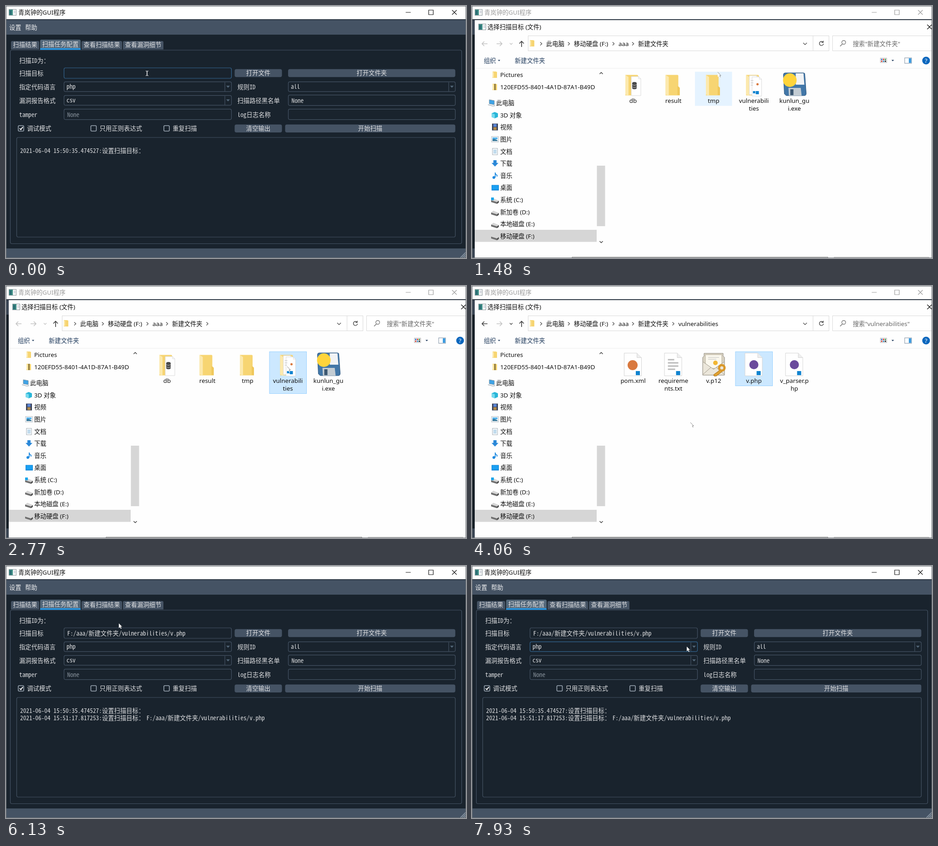
An HTML page that plays this animation: 1011x554 px, repeating every 8000 ms.

```html
<!DOCTYPE html>
<html lang="zh-CN">
<head>
<meta charset="utf-8">
<title>扫描任务配置</title>
<style>
html, body { margin: 0; width: 100%; height: 100%; overflow: hidden; background: #19232d; }
svg { display: block; width: 1011px; height: 554px; }
text { white-space: pre; }
.ui { font: 13.33px "Noto Sans", "Noto Sans CJK SC", "Noto Sans CJK", sans-serif; }
.form {
  font: 300 13.33px "Noto Sans Mono CJK SC", "Noto Sans CJK SC", "Noto Sans CJK", sans-serif;
  font-feature-settings: "hwid";
  fill: #e0e1e3;
}
.line { fill: none; stroke: #455364; stroke-width: 1.2; }
.line.focus { stroke: #346792; }
.thin { fill: none; stroke: #666; stroke-width: 1.2; }
.off { display: none; }
</style>
</head>
<body>
<svg id="stage" viewBox="0 0 1011 554" xmlns="http://www.w3.org/2000/svg"></svg>
<script>
const FOLDER = '新建文件夹';
const TARGET = `F:/aaa/${FOLDER}/vulnerabilities/v.php`;

// Basic shapes
const rect = (x, y, w, h, fill, extra = '') =>
  `<rect x="${x}" y="${y}" width="${w}" height="${h}" fill="${fill}" ${extra}/>`;
const path = (d, extra = 'class="thin"') => `<path d="${d}" ${extra}/>`;
const fillPath = (d, fill) => path(d, `fill="${fill}"`);
const dot = (x, y, r, fill) => `<circle cx="${x}" cy="${y}" r="${r}" fill="${fill}"/>`;
const group = (id, body) => `<g id="${id}">${body}</g>`;
const at = (x, y, body) => `<g transform="translate(${x} ${y})">${body}</g>`;
const ui = (x, y, s, fill = '#111', extra = '') =>
  `<text class="ui" x="${x}" y="${y}" fill="${fill}" ${extra}>${s}</text>`;
const centered = (x, y, s) => ui(x, y, s, '#111', 'text-anchor="middle"');
const form = (x, y, s, extra = '') => `<text class="form" x="${x}" y="${y}" ${extra}>${s}</text>`;

// Form widgets
const box = (x, y, w, h, id = '') =>
  `<rect ${id && `id="${id}"`} class="line" x="${x}" y="${y}" width="${w}" height="${h}" rx="3.5"/>`;
const combo = (x, y, w, s, id) => box(x, y, w, 21.5, id) +
  path(`M${x + w - 14.5} ${y + 1}v20`, 'class="line"') +
  fillPath(`M${x + w - 11.5} ${y + 8.5}h8l-4 4.5z`, '#54687a') + form(x + 5.5, y + 15.5, s);
const button = (x, y, w, s, id = '') =>
  `<rect ${id && `id="${id}"`} x="${x}" y="${y}" width="${w}" height="17.5" rx="4" fill="#455364"/>` +
  form(x + w / 2, y + 13.7, s, 'text-anchor="middle"');
const check = (x, s, on) =>
  `<rect x="${x}" y="263" width="12" height="12" rx="2" fill="none" stroke="#9da9b5" stroke-width="1.6"/>` +
  (on ? path(`M${x + 3} 269l2.6 2.8 4.4-6`, 'fill="none" stroke="#fff" stroke-width="2"') : '') +
  form(x + 19.3, 274, s);
const tab = (x, w, s, on) => {
  const top = on ? 74 : 77;
  return path(`M${x} 95.5V${top + 3}q0-3 3-3h${w - 6}q3 0 3 3V95.5z`, `fill="${on ? '#54687a' : '#455364'}"`) +
    (on ? rect(x, 93, w, 3.2, '#259ae9') : '') +
    form(x + w / 2, on ? 89 : 90.3, s, 'text-anchor="middle"');
};

const appIcon = (x, y) => at(x, y,
  rect(.5, .5, 16, 13, '#f4f6f6', 'stroke="#8b959b"') + rect(1, 1, 8, 12, '#3f8f86') +
  rect(2, 3, 4, 9, '#2c6c74') + rect(11, 4, 4, 1, '#aab') + rect(11, 7, 4, 1, '#aab'));

function appWindow() {
  const labels = ['扫描ID为：', '扫描目标', '指定代码语言', '漏洞报告格式', 'tamper'];
  const rows = [124.5, 152.5, 182.5, 212.5, 243.5];
  return rect(0, 0, 1011, 554, '#19232d') + rect(0, 0, 1011, 30, '#fff') +
    rect(0, 29.5, 1011, 33.5, '#455364') + rect(0, 29, 1011, 2, '#2c3642') +
    rect(0, 533, 1011, 21, '#455364') +
    path('M999 553l11-11M1003 553l7-7M1007 553l3-3', 'fill="none" stroke="#9da9b5" stroke-width="1.3"') +
    appIcon(6, 7) +
    group('caption', ui(27, 19, '青岚钟的GUI程序', 'currentColor') +
      path('M878.5 14h11M929 9h10v10h-10zM980.5 9l10 10M990.5 9l-10 10',
        'fill="none" stroke="currentColor" stroke-width="1.2"')) +
    ui(7, 52, '设置', '#f0f1f2') + ui(42, 52, '帮助', '#f0f1f2') +
    box(9.5, 97, 992, 425.5) +
    tab(11, 62, '扫描结果') + tab(75, 89, '扫描任务配置', true) +
    tab(166, 89, '查看扫描结果') + tab(257, 89, '查看漏洞细节') +
    labels.map((s, i) => form(29, rows[i], s)).join('') +
    ['规则ID', '扫描路径黑名单', 'log日志名称'].map((s, i) => form(508.5, rows[i + 2], s)).join('') +
    box(127.5, 136, 368, 23, 'target') + group('targetText', form(134.5, 152.5, TARGET)) +
    combo(127.5, 166.7, 368, 'php', 'language') + combo(127.5, 196.7, 368, 'csv') +
    box(127.5, 226.7, 368, 23) + form(134.5, 243.5, 'None', 'style="fill:#8a949e"') +
    combo(620.5, 166.7, 367, 'all') +
    box(620.5, 195.7, 367, 23) + form(627.5, 212.5, 'None') + box(620.5, 226.7, 367, 23) +
    button(502.5, 138.7, 104, '打开文件', 'openFile') + button(620, 138.7, 367.5, '打开文件夹') +
    button(502.5, 260.5, 104, '清空输出') + button(613.5, 260.5, 374, '开始扫描') +
    check(27, '调试模式', true) + check(186.5, '只用正则表达式') + check(347, '重复扫描') +
    box(23.5, 289, 964, 219) +
    form(31, 323, '2021-06-04 15:50:35.474527:设置扫描目标：') +
    group('log', form(31, 338.7, '2021-06-04 15:51:17.817253:设置扫描目标：') + form(308.7, 338.7, TARGET));
}

// Icons drawn around a cell's centre x, with y = 0 at the stage top
const folder = fillPath('M-17 151.5h26q2 0 2 2v23l3 3v17h-31z', '#f7d572') +
  fillPath('M9 176l5 4v16h-5z', '#efc85c') +
  fillPath('M-17 151.5l7 4.500v41.500l-7-3z', '#fce9ad');
const sheet = fillPath('M-4 155h16l5 5v37h-21z', '#fff') +
  path('M-4 155h16l5 5v37h-21zM12 155v5h5', 'fill="none" stroke="#d2d2d2" stroke-width=".8"');
const badge = rect(6, 187, 9, 9, '#1183cf');
const page = path('M-19.5 147.5h28l10 10v40h-38z', 'fill="#fff" stroke="#d4d4d4"') +
  path('M8.5 147.5v10h10', 'fill="#eee" stroke="#d4d4d4"');
const dbIcon = folder + sheet +
  fillPath('M-2 170q0-3 5-3t5 3v10q0 3-5 3t-5-3z', '#4a4a4a') +
  path('M-2 173q5 3 10 0M-2 178q5 3 10 0', 'fill="none" stroke="#ddd" stroke-width=".8"');
const docsIcon = folder + at(-6, -2, sheet) + at(0, 1, sheet) +
  path('M-7 164h6M-7 169h6M-7 174h5', 'stroke="#bbb"') +
  dot(8, 172, 2.5, '#d9793f') + rect(-2, 187, 5, 5, '#1183cf') + rect(4, 187, 7, 7, '#1183cf');
const diskIcon = path('M-24 151q0-4 4-4h40q3 0 3 3l3 42q0 5-4 5h-40l-4-4z', 'fill="#4277a8" stroke="#2c567e"') +
  fillPath('M3 148h17l2 25h-19z', '#f1f3f5') + fillPath('M-13 180h27l2 17h-28z', '#c3ccd3') +
  rect(-9, 183, 7, 13, '#3c5872') + dot(-10, 163, 15, '#ffd43b');
const certIcon = path('M-21 148h42v6l3 3v39h-48v-39l3-3z', 'fill="#d9d3c4" stroke="#8f897c"') +
  rect(-18, 151, 36, 30, '#fbf8ee', 'stroke="#b8b09c"') + path('M-12 157h24M-12 161h18', 'stroke="#bbb"') +
  fillPath('M-23 167l23 16 23-16v28h-46z', '#ebe6da') +
  path('M-23 167l23 16 23-16M-23 194l17-15M23 194l-17-15', 'fill="none" stroke="#9b9486"') +
  dot(4, 169, 5, '#f2b632') +
  path('M15 184L0 195l1 3h5l13-10', 'fill="#e0a030" stroke="#a06d12"') +
  `<circle cx="18" cy="180" r="6" fill="none" stroke="#d9982a" stroke-width="5"/>`;
const pageIcon = body => page + body + badge;
const textLines = path('M-12 162h14M-12 169h23M-12 176h23M-12 183h16', 'fill="none" stroke="#b9b9b9" stroke-width="3"');

const columns = [354, 442.5, 531, 619.5, 708.5];
const listing = items => items.map(([icon, ...names], i) =>
  at(columns[i], 0, icon + names.map((s, n) => centered(0, 213 + 17 * n, s)).join(''))).join('');
const tile = (id, x, h) => `<rect id="${id}" x="${x}" y="144.5" width="81.5" height="${h}"/>`;

const chevron = (x, y, right) => path(right
  ? `M${x - 2} ${y - 3.5}l3.5 3.5-3.5 3.5` : `M${x - 4} ${y - 2}l4 4 4-4`,
  'fill="none" stroke="#555" stroke-width="1.4"');
const arrow = (id, x, dir) =>
  `<path id="${id}" d="M${x - 6 * dir} 83h${12 * dir}m${-5 * dir}-5l${5 * dir} 5l${-5 * dir} 5" fill="none" stroke="#c4c4c4" stroke-width="1.6"/>`;

const drive = at(0, 2, fillPath('M-8-1l5-4 12 5-4 3z', '#d6d6d6') +
  fillPath('M-8-1l13 4v4l-13-4z', '#6f6f6f') + fillPath('M5 3l4-3v4l-4 3z', '#4d4d4d'));
const smallFolder = fillPath('M-5-7h7l3 1v13h-10z', '#f7d572') + fillPath('M-5-7l3 2v12l-3-2z', '#fce9ad');
const computer = at(-7, 0, fillPath('M-5-7l11 2v9l-11-2z', '#3fa3e6') +
  path('M-5-7l11 2v9l-11-2zM-8 4l11 3 5-1', 'fill="none" stroke="#7f93a2"'));
const sideRows = [
  [151, 'Pictures', smallFolder],
  [178, '120EFD55-8401-4A1D-87A1-B49D', smallFolder + rect(-1, -7, 3, 14, '#8a7740')],
  [213, '此电脑', computer],
  [240, '3D 对象', fillPath('M-7-4l7-3 7 3v8l-7 3-7-3z', '#29b6d8') + fillPath('M-7-4l7 2v9l-7-3z', '#78d9ee')],
  [266.5, '视频', rect(-6, -8, 13, 15, '#39435c') + rect(-3, -7, 7, 6, '#5a86d8') + rect(-3, 0, 7, 6, '#b08a4a')],
  [293, '图片', rect(-7, -6, 15, 12, '#fff', 'stroke="#a9b4bd"') + rect(-5, -4, 11, 4, '#55b4ee') + fillPath('M-5 4v-4l4-1 7 3v2z', '#3a7a9c')],
  [320, '文档', rect(-5, -7, 11, 14, '#fff', 'stroke="#9aa7b1"') + path('M-3-3h7M-3 0h7M-3 3h7', 'stroke="#4b96c8"')],
  [346, '下载', fillPath('M-3-7h7v6h4l-7.5 8-7.5-8h4z', '#2b88d8')],
  [373, '音乐', dot(-2, 4, 3, '#1e8ae0') + path('M1 4v-11q0 4 4 6v3', 'fill="none" stroke="#1e8ae0" stroke-width="1.8"')],
  [399.5, '桌面', rect(-7, -6, 16, 12, '#0a84d8') + rect(-6, -5, 14, 9, '#1ba0f2')],
  [426, '系统 (C:)', drive + rect(-8, -5, 6, 6, '#18a5ea')],
  [453, '新加卷 (D:)', drive],
  [479.5, '本地磁盘 (E:)', drive],
  [506, '移动硬盘 (F:)', drive]
];

function sidebar() {
  return rect(6, 492, 268, 26.5, '#d6d6d6') +
    '<clipPath id="side"><rect x="6" y="138" width="268" height="400"/></clipPath><g clip-path="url(#side)">' +
    sideRows.map(([y, s, icon], i) => at(50, y, icon) + ui(i === 2 ? 53 : 62, y + 4.8, s)).join('') + '</g>' +
    path('M280.5 149.5l3.5-3.5 3.5 3.5M280.5 517l3.5 3.5 3.5-3.5', 'fill="none" stroke="#444" stroke-width="1.5"') +
    rect(274.5, 351, 18, 133, '#d6d6d6');
}

function toolbar() {
  const crumbs = [[163, '此电脑'], [224, '移动硬盘 (F:)'], [322, 'aaa'], [365, FOLDER]];
  const frame = 'stroke="#d9d9d9"';
  return arrow('back', 28, -1) + arrow('forward', 60, 1) +
    path('M83 81.5l3 3 3-3', 'id="recent" fill="none" stroke="#c4c4c4" stroke-width="1.3"') +
    path('M109 90V77.5M104 82.5l5-5 5 5', 'fill="none" stroke="#444" stroke-width="1.7"') +
    rect(123.5, 65.5, 626, 33, '#fff', frame) + rect(749.5, 65.5, 35, 33, '#fff', frame) +
    rect(792.5, 65.5, 230, 33, '#fff', frame) + at(132, 82, smallFolder) +
    [152, 213, 311, 354].map(x => chevron(x, 83, true)).join('') +
    crumbs.map(([x, s]) => ui(x, 87.5, s)).join('') +
    group('lastChevron', chevron(442.5, 83, true)) + group('lastCrumb', ui(453.5, 87.5, 'vulnerabilities')) +
    chevron(732, 83) +
    path('M771 79a4.5 4.500 0 1 0 1.500 4M772 76.500v3.500h-4', 'fill="none" stroke="#444" stroke-width="1.4"') +
    `<circle cx="817" cy="80" r="4.2" class="thin"/>` + path('M814 83.5l-5 5') +
    group('searchOuter', ui(837, 87.5, `搜索"${FOLDER}"`, '#666')) +
    group('searchInner', ui(837, 87.5, '搜索"vulnerabilities"', '#666')) +
    ui(26, 125, '组织', '#1e395b') + fillPath('M57 118.5h5l-2.5 3z', '#1e395b') + ui(94, 125, FOLDER, '#1e395b') +
    rect(897.5, 114.5, 14, 10, '#fff', 'stroke="#b5b5b5"') +
    ['#3a6fc4', '#d2453b', '#469c52', '#d2453b', '#3a8fc4', '#333']
      .map((c, i) => rect(899 + i % 3 * 4, i < 3 ? 116 : 120, 3, 3, c)).join('') +
    fillPath('M922 118.5h5.5l-2.7 3z', '#1e395b') +
    rect(951, 114, 15, 12, '#fff', 'stroke="#7b8ba0"') + rect(960, 115, 5.5, 10, '#3c9be0') +
    dot(998, 120, 8.5, '#0b66bd') + ui(998, 125, '?', '#fff', 'text-anchor="middle" font-weight="700"') +
    rect(6, 136.5, 1005, 1, '#ededed');
}

function dialog() {
  return rect(0, 30, 6, 524, '#000', 'opacity=".18"') + rect(6, 31, 1005, 523, '#fefefe') +
    appIcon(14, 39) + ui(34, 51.3, '选择扫描目标 (文件)') +
    path('M1000.5 41l10 10M1010.5 41l-10 10', 'fill="none" stroke="#111" stroke-width="1.3"') +
    toolbar() + sidebar() +
    group('outer', tile('tmpTile', 490, 75) + tile('vulTile', 579, 92) +
      listing([[dbIcon, 'db'], [folder, 'result'], [folder, 'tmp'],
        [docsIcon, 'vulnerabili', 'ties'], [diskIcon, 'kunlun_gu', 'i.exe']])) +
    group('inner', tile('phpTile', 579, 75) +
      listing([[pageIcon(dot(-1, 174, 11, '#d9793f')), 'pom.xml'], [pageIcon(textLines), 'requireme', 'nts.txt'],
        [certIcon, 'v.p12'], [pageIcon(dot(0, 173, 10, '#6a4a9c')), 'v.php'],
        [pageIcon(dot(0, 173, 10, '#6a4a9c')), 'v_parser.p', 'hp']])) +
    rect(220, 552, 562, 8, '#fff', 'stroke="#777"') + rect(796, 552, 208, 8, '#e4e4e4', 'stroke="#bbb"');
}

const pointer = fillPath('M0 0v10.5l2.5-2.3 1.8 3.8 1.7-.8-1.8-3.7h3z', '#fff') +
  path('M0 0l7.2 7.5h-3l1.8 3.7', 'fill="none" stroke="#666" stroke-width=".8"');
const beam = path('M-3-5h2q1 0 1 1v8q0 1-1 1h-2M3-5h-2q-1 0-1 1v8q0 1 1 1h2', 'fill="none" stroke="#fff" stroke-width="1"');

document.getElementById('stage').innerHTML = group('app', appWindow()) + group('dialog', dialog()) +
  '<rect x=".5" y=".5" width="1010" height="553" fill="none" stroke="#6f7479"/>' +
  group('cursor', group('pointer', pointer) + group('beam', beam));

// Cursor steps: time, x, y
const moves = [
  [0, 310, 148], [550, 345, 148], [740, 450, 148], [920, 525, 147], [1110, 540, 145.5],
  [1670, 566, 158], [1860, 600, 172], [2050, 615, 176], [2230, 618, 177],
  [3690, 620, 175], [4060, 480, 300], [4250, 236, 444], [4430, -50, -50],
  [5370, 248, 126], [6310, 290, 150], [6490, 390, 205], [6670, 490, 270], [6850, 523, 293],
  [7030, 516, 280], [7210, 502, 248], [7390, 488, 216], [7570, 477, 190], [7750, 472, 177]
];
const LOOP = 8000;
const el = id => document.getElementById(id);
const show = (id, on) => el(id).classList.toggle('off', !on);
const paint = (id, state) => {
  const [fill, stroke] = { hover: ['#e5f3ff', 'none'], selected: ['#cce8ff', '#99d1ff'],
    idle: ['#d9d9d9', 'none'] }[state] || ['none', 'none'];
  el(id).setAttribute('fill', fill);
  el(id).setAttribute('stroke', stroke);
};

function render(t) {
  const within = (a, b) => t >= a && t < b;
  const inside = t >= 2960, done = t >= 6130;
  show('dialog', within(1480, 6130));
  el('caption').style.color = within(1280, 6130) ? '#9a9a9a' : '#111';
  el('target').classList.toggle('focus', t < 1280);
  el('language').classList.toggle('focus', t >= 7930);
  el('openFile').setAttribute('fill', within(920, 6130) ? '#54687a' : '#455364');
  show('targetText', done);
  show('log', done);

  show('outer', !inside);
  show('inner', inside);
  show('lastChevron', t >= 2230);
  show('lastCrumb', inside);
  show('searchOuter', !inside);
  show('searchInner', inside);
  for (const id of ['back', 'recent']) el(id).setAttribute('stroke', inside ? '#444' : '#c4c4c4');
  paint('tmpTile', t < 1860 && 'hover');
  paint('vulTile', t >= 2230 ? 'selected' : t >= 1860 && 'hover');
  paint('phpTile', t >= 5940 ? 'idle' : t >= 3880 ? 'selected' : t >= 3690 && 'hover');

  const [, x, y] = moves.findLast(m => m[0] <= t);
  el('cursor').setAttribute('transform', `translate(${x} ${y})`);
  show('beam', t < 920);
  show('pointer', t >= 920);
}

const start = performance.now();
function tick() {
  render((performance.now() - start) % LOOP);
  requestAnimationFrame(tick);
}
tick();
</script>
</body>
</html>
```
